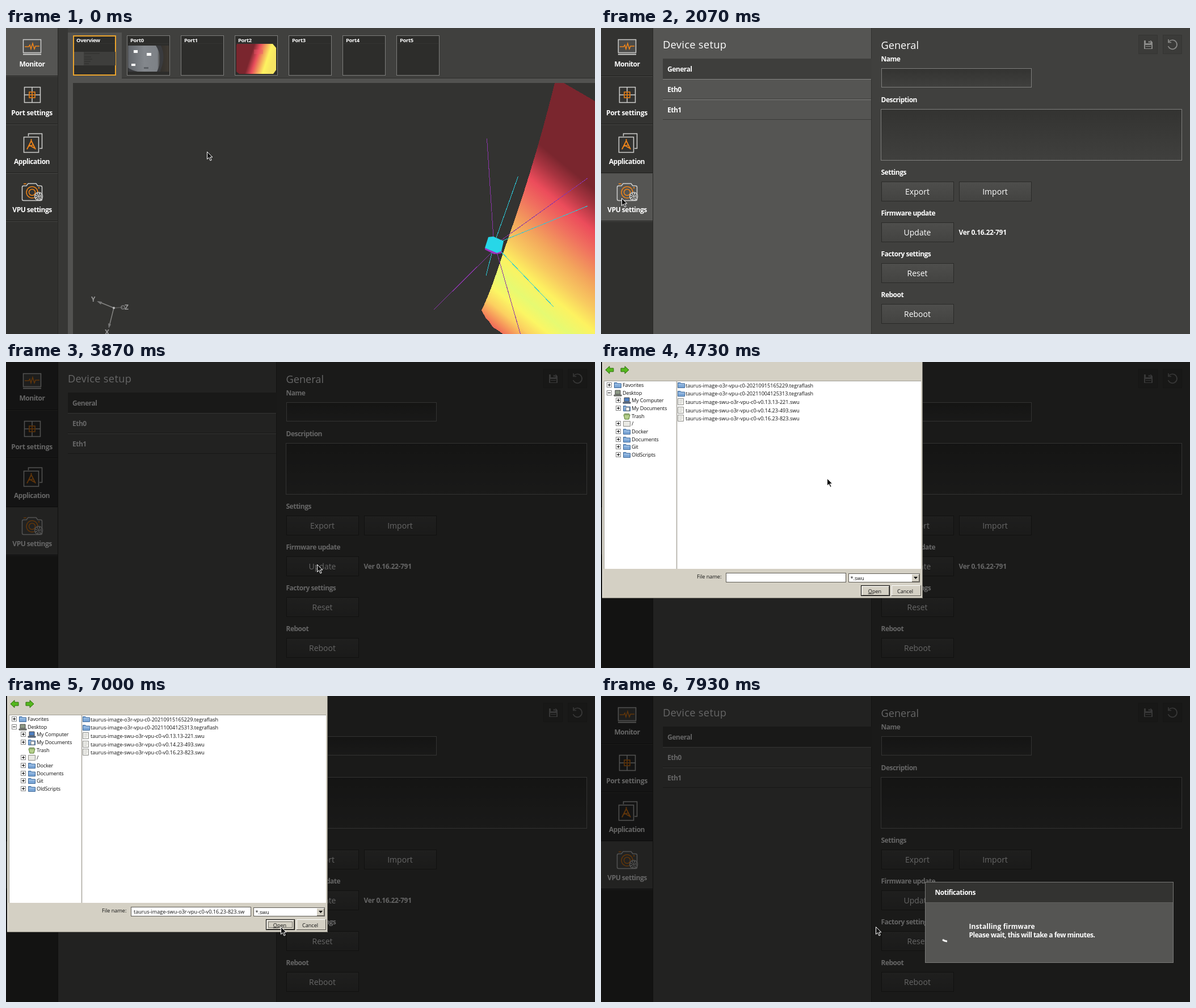
Animation of 1038 by 540 pixels, one loop 8000 ms. Source, as an HTML page:

```html
<!DOCTYPE html>
<html lang="en">
<head>
<meta charset="utf-8">
<title>Firmware update</title>
<style>
html, body { margin: 0; width: 100%; height: 100%; overflow: hidden; background: #333331; }
svg { display: block; font-family: "Open Sans", "Noto Sans", sans-serif; cursor: default; }
text { fill: #fff; font-size: 12px; font-weight: 700; letter-spacing: -.5px; white-space: pre; }
.mid { text-anchor: middle; }
.loose { letter-spacing: -.3px; }
.open { letter-spacing: .1px; }
.tab { font-size: 9.4px; letter-spacing: -.3px; }
.head { font-size: 18.2px; font-weight: 500; letter-spacing: 0; }
.head.loose { letter-spacing: .35px; }
.label { font-size: 14px; font-weight: 500; letter-spacing: 0; }
.axis { font-size: 12px; fill: #999; letter-spacing: 0; }
.crisp { shape-rendering: crispEdges; }
#dialog text { fill: #111; font-size: 9.1px; font-weight: 400; letter-spacing: 0; }
#dialog .node { letter-spacing: -.15px; }
#dialog .lit { fill: #fff; }

/* the small lead keeps every switch just ahead of its frame time */
.play { animation: 8s step-end -10ms infinite; }
#monitor { animation-name: monitor; }
#setup { animation-name: setup; }
#mark { animation-name: mark; }
#hover { animation-name: hover; }
#dim { animation-name: dim; }
#dialog { animation-name: dialog; }
#files { animation-name: files; }
#caret { animation-name: caret; }
#picked { animation-name: picked; }
#row { animation-name: row; }
#focus { animation-name: focus; }
#note { animation-name: note; }
#ring { animation-name: spin, arc; animation-timing-function: steps(11, start), steps(6, start); }
#cursor { animation-name: cursor; animation-timing-function: steps(2, start); }

@keyframes monitor { 0% { opacity: 1 } 25%, 100% { opacity: 0 } }
@keyframes setup { 0% { opacity: 0 } 25%, 100% { opacity: 1 } }
@keyframes mark { 0% { transform: none } 25%, 100% { transform: translateY(256px) } }
@keyframes hover { 0% { opacity: 0 } 39.167% { opacity: 1 } 48.333%, 100% { opacity: 0 } }
@keyframes dim { 0% { opacity: 0 } 48.333%, 100% { opacity: .6 } }
@keyframes dialog { 0% { opacity: 0 } 49.167% { opacity: 1 } 90%, 100% { opacity: 0 } }
@keyframes files { 0% { opacity: 0 } 50%, 100% { opacity: 1 } }
@keyframes caret { 0%, 55.833%, 66.667%, 100% { opacity: 0 } 50%, 61.667% { opacity: 1 } }
@keyframes picked { 0% { opacity: 0 } 68.333%, 100% { opacity: 1 } }
@keyframes row { 0% { opacity: 0 } 68.333% { opacity: 1 } 87.5%, 100% { opacity: 0 } }
@keyframes focus { 0% { opacity: 0 } 87.5%, 100% { opacity: 1 } }
@keyframes note { 0% { opacity: 0 } 90.833%, 100% { opacity: 1 } }
@keyframes spin { 0%, 90.833% { transform: rotate(-266deg) } 100% { transform: rotate(94deg) } }
@keyframes arc {
  0%, 90.833%, 98.5%, 100% { stroke-dasharray: 8.5 100 }
  94.5% { stroke-dasharray: 36 100 }
}
@keyframes cursor {
  0%, 13.333% { transform: translate(354px, 218px); animation-timing-function: steps(3, start) }
  15.833% { transform: translate(277px, 211px); animation-timing-function: steps(4, start) }
  19.167% { transform: translate(33px, 293px); animation-timing-function: steps(1, start) }
  20%, 30% { transform: translate(36px, 300px); animation-timing-function: steps(7, start) }
  35.833%, 37.5% { transform: translate(440px, 302px); animation-timing-function: steps(3, start) }
  40%, 41.667% { transform: translate(520px, 345px); animation-timing-function: steps(5, start) }
  45.833%, 55% { transform: translate(548px, 357px); animation-timing-function: steps(3, start) }
  57.5%, 58.333% { transform: translate(499px, 304px) }
  60%, 60.833% { transform: translate(398px, 205px) }
  62.5%, 63.333% { transform: translate(333px, 129px) }
  65%, 65.833% { transform: translate(311px, 106px) }
  67.5%, 73.333% { transform: translate(302px, 96px) }
  75%, 75.833% { transform: translate(415px, 283px) }
  77.5%, 78.333% { transform: translate(479px, 384px) }
  80% { transform: translate(485px, 407px); animation-timing-function: step-end }
  80.833% { transform: translate(486px, 408px); animation-timing-function: step-end }
  84.167%, 100% { transform: translate(484px, 407px) }
}
</style>
</head>
<body>
<svg width="1038" height="540" viewBox="0 0 1038 540">
  <defs>
    <linearGradient id="heat" gradientUnits="userSpaceOnUse" x1="940" y1="205" x2="738" y2="451">
      <stop offset="0" stop-color="#7a262e"/>
      <stop offset=".08" stop-color="#a83440"/>
      <stop offset=".18" stop-color="#ec4c5b"/>
      <stop offset=".28" stop-color="#f0705f"/>
      <stop offset=".41" stop-color="#f3a55c"/>
      <stop offset=".52" stop-color="#f8cb60"/>
      <stop offset=".61" stop-color="#fdf260"/>
      <stop offset=".71" stop-color="#e6fa72"/>
      <stop offset=".78" stop-color="#fbf664"/>
      <stop offset=".85" stop-color="#fcd060"/>
      <stop offset=".91" stop-color="#f5905a"/>
      <stop offset=".97" stop-color="#ec5058"/>
    </linearGradient>
    <linearGradient id="thumb" x2="1" y2=".25">
      <stop offset=".43" stop-color="#7a262e"/>
      <stop offset=".58" stop-color="#e84c5b"/>
      <stop offset=".72" stop-color="#f3a55c"/>
      <stop offset=".85" stop-color="#fdf260"/>
      <stop offset="1" stop-color="#f6e562"/>
    </linearGradient>
    <linearGradient id="photo">
      <stop offset="0" stop-color="#62666b"/>
      <stop offset=".4" stop-color="#83878c"/>
      <stop offset=".72" stop-color="#7d8186"/>
      <stop offset=".8" stop-color="#34322e"/>
      <stop offset="1" stop-color="#3f3932"/>
    </linearGradient>
    <linearGradient id="field" x2="0" y2="1">
      <stop offset="0" stop-color="#333331"/><stop offset="1" stop-color="#40403e"/>
    </linearGradient>
    <linearGradient id="push" x2="0" y2="1">
      <stop offset="0" stop-color="#4e4e4c"/><stop offset="1" stop-color="#434341"/>
    </linearGradient>
    <clipPath id="nameClip"><rect x="222" y="374" width="208" height="14"/></clipPath>
    <g id="folder">
      <path d="M.5 1.5H5L6.500 3H12.500V10.500H.5Z" fill="#7ba6d6" stroke="#3c6797"/>
      <path d="M1 5H12" stroke="#b9d3ef"/>
    </g>
    <g id="doc">
      <path d="M.5 .5H10.500V11.500H.5Z" fill="#f4f4f0" stroke="#8c8c88"/>
      <path d="M2.500 3.500H8.500M2.500 6H8.500M2.500 8.500H7" stroke="#c4c4c0"/>
    </g>
    <path id="arrow" d="M0 6.500L7 0V3.500H14V9.500H7V13Z" fill="#55b81e" stroke="#2c6f0c"/>
  </defs>

  <rect width="1038" height="540" fill="#30302e"/>

  <g id="monitor" class="play">
    <rect x="92" width="946" height="540" fill="#40403e"/>
    <rect x="92" width="17" height="540" fill="#373735"/>
    <path d="M109 540V8H204V89H1038V540Z" fill="#525250"/>
    <path d="M204 88.500H1038" stroke="#2d2d2b"/>
    <rect x="118" y="97" width="920" height="443" fill="#333331"/>
    <g id="tabs"></g>
    <path d="M120 42H193V66H120Z" fill="#3e3e3c"/>
    <path d="M120 42H137V66H120Z" fill="#4a4a48"/>
    <path d="M138 45H165M138 51H150M138 55H152M138 59H149M138 63H146" stroke="#2f2f2d"/>
    <rect x="215" y="31" width="72" height="46" fill="url(#photo)"/>
    <path d="M215 77V70Q222 75 232 77ZM264 31Q278 52 266 77H271Q283 52 273 31Z" fill="#3a3b3e"/>
    <path d="M225 39H232V44H225ZM248 44H256V49H248ZM221 63H228V67H221Z" fill="#fff"/>
    <path d="M243 69H251V72H243Z" fill="#5b5f64"/>
    <path d="M407 28H470L476 35V74L471 81H411L406 77V30Z" fill="url(#thumb)"/>
    <path d="M437 38H453V46H437Z" fill="#e9566a" opacity=".4"/>

    <path class="crisp" d="M967 97H983L1038 129V540H876L866 533L858 528L852 519L846 513L838 498Q853 468 870 415L905 313Q941 203 967 97Z" fill="url(#heat)"/>
    <g class="crisp" fill="none" stroke="#2cc8d8">
      <path d="M902.500 262L864 370M1025 314L874 376M965 492L868 390M846 437L857 394"/>
      <path d="M847.500 195L859 370M1025 265L872 375M754 497L858 394M906.500 540L865 396" stroke="#8a35a8"/>
    </g>
    <path d="M844 388L866 396L874 393L872 398L860 399L844 391Z" fill="#a032c0"/>
    <path d="M850 369L859 368L877 376L873 394L865 397L844 388Z" fill="#27d7e8"/>

    <g fill="none" stroke="#858583" stroke-width="1.500">
      <path d="M190 494L163 483M190 494L182 526"/>
      <path d="M190 494L206 493" stroke="#5d5d5b"/>
      <circle cx="206" cy="493" r="3" stroke="#777"/>
    </g>
    <path d="M160 482L169 483L167 488ZM181 530L180 521L185 523Z" fill="#777"/>
    <circle cx="190" cy="494" r="2" fill="#bbb"/>
    <text class="axis" x="150" y="483">Y</text>
    <text class="axis" x="209" y="497">Z</text>
    <text class="axis" x="174" y="541">X</text>
  </g>

  <g id="setup" class="play">
    <rect x="92" width="384" height="540" fill="#555553"/>
    <rect x="476" width="562" height="540" fill="#40403e"/>
    <path d="M476.500 0V540" stroke="#30302e"/>
    <text class="head loose" x="109" y="36">Device setup</text>
    <rect x="109" y="54" width="368" height="36" fill="#3e3e3c"/>
    <path d="M109 90.500H476M109 126.500H476" stroke="#858583"/>
    <path d="M109 125.500H476M109 161.500H476" stroke="#3a3a38"/>
    <text x="117" y="77">General</text>
    <text x="117" y="113">Eth0</text>
    <text x="117" y="149">Eth1</text>
    <text class="head" x="493.500" y="37">General</text>
    <g id="labels"></g>
    <g fill="url(#field)" stroke="#7f7f7d">
      <rect x="494.500" y="71.500" width="264" height="33"/>
      <rect x="493.500" y="143.500" width="530" height="90"/>
    </g>
    <g fill="#3b3b39" stroke="#353533">
      <rect x="947.500" y="12.500" width="33" height="33"/>
      <rect x="990.500" y="12.500" width="33" height="33"/>
    </g>
    <path d="M957 22H969L972 25V37H957Z" fill="#8b8b89"/>
    <path d="M960 22H968V27H960ZM959 30H970V36H959Z" fill="#3b3b39"/>
    <path d="M965 23H967V26H965ZM960 32H969V33H960Z" fill="#8b8b89"/>
    <path d="M1001 24A8 8 0 1 1 999.500 32M1000 20V25.500H1005" fill="none" stroke="#8b8b89" stroke-width="1.700"/>
    <g id="buttons"></g>
    <g id="hover" class="play">
      <rect x="494.500" y="343.500" width="127" height="34" fill="#5c5c5a" stroke="#2a2a28"/>
      <text class="label mid" x="557.500" y="366">Update</text>
    </g>
    <text class="loose" x="630.500" y="365">Ver 0.16.22-791</text>
  </g>

  <g id="sidebar">
    <rect width="92" height="341" fill="#333331"/>
    <rect id="mark" class="play" width="92" height="85" fill="#555553"/>
    <path d="M0 84.500H92M0 169.500H92M0 255.500H92M0 340.500H92" stroke="#1f1f1d"/>
    <path d="M0 85.500H92M0 170.500H92M0 256.500H92M0 341.500H92" stroke="#484846"/>
    <path d="M91.500 0V540" stroke="#282826"/>
    <g fill="none" stroke="#cfcfcd" stroke-width="1.500">
      <path d="M30.500 20.500H61.500V43.500H30.500Z" fill="#4b4b49"/>
      <path d="M30 46.500H62" stroke-width="2"/>
      <path d="M33 33H40L42 30L44 37L47 27L50 37L52 32H59" stroke="#f08519"/>
      <path d="M32.500 104.500H60.500V131.500H32.500ZM46 104V112M46 124V132M32 118H40M52 118H60"/>
      <path d="M41 113H51V123H41ZM46 113V123M41 118H51" stroke="#f08519"/>
      <path d="M39.500 191V186.500H63.500V212.500H59"/>
      <path d="M31.500 192.500H57.500V219.500H31.500Z"/>
      <path d="M37 214L44.500 199L52 214M39 209L49 206M44.500 199V196M40 206L50 212" stroke="#f08519" stroke-width="1.800"/>
      <path d="M31 278.500H36L39 274.500H53L56 278.500H61Q63.500 278.500 63.500 281V302Q63.500 304.500 61 304.500H31Q28.500 304.500 28.500 302V281Q28.500 278.500 31 278.500Z"/>
      <g stroke="#f08519"><circle cx="46" cy="290" r="10"/><circle cx="46" cy="290" r="5.500"/><path d="M31 275H36"/></g>
      <circle cx="57.500" cy="297" r="7" fill="#3b3b39"/>
      <circle cx="57.500" cy="297" r="4.500" stroke-width="3" stroke-dasharray="2 1.530"/>
      <circle cx="57.500" cy="297" r="1.500"/>
    </g>
    <circle cx="58" cy="282" r="1.300" fill="#f08519"/>
    <text class="mid" x="46" y="68">Monitor</text>
    <text class="mid loose" x="45.500" y="154">Port settings</text>
    <text class="mid" x="45.500" y="240">Application</text>
    <text class="mid" x="46" y="325">VPU settings</text>
  </g>

  <rect id="dim" class="play" width="1038" height="540"/>

  <g id="dialog" class="play">
    <path d="M2 0H567V417H2Z" fill="#d4d0c4"/>
    <path d="M2.500 0V416" stroke="#efede6"/>
    <path d="M566.500 0V416.500H2" fill="none" stroke="#77746c"/>
    <use href="#arrow" x="8" y="7.500"/>
    <use href="#arrow" transform="translate(49 7.500) scale(-1 1)"/>
    <path d="M6 33H564V365H6Z" fill="#fff"/>
    <path d="M5.500 365V33.500H564" fill="none" stroke="#a09d94"/>
    <path d="M133.500 33V365" stroke="#aaa79e" stroke-width="1.500"/>
    <g id="tree"></g>
    <g id="files" class="play"></g>
    <g id="row" class="play">
      <rect x="148" y="92" width="203" height="14" fill="#0a246a"/>
      <text class="lit" x="149" y="103">taurus-image-swu-o3r-vpu-c0-v0.16.23-823.swu</text>
    </g>
    <text x="169" y="382">File name:</text>
    <g fill="#fff" stroke="#5f5c55">
      <rect x="220.500" y="372.500" width="211" height="16"/>
      <rect x="436.500" y="373.500" width="125" height="15"/>
    </g>
    <path d="M548 375H561V388H548Z" fill="#d4d0c4"/>
    <path d="M548 387.500H560.500V375" fill="none" stroke="#66635c"/>
    <path d="M551 379H558L554.500 383Z"/>
    <text x="439.500" y="385">*.swu</text>
    <path id="caret" class="play" d="M225.500 374V386" stroke="#000"/>
    <g clip-path="url(#nameClip)">
      <text id="picked" class="play" x="225" y="384">taurus-image-swu-o3r-vpu-c0-v0.16.23-823.sw</text>
    </g>
    <rect x="458.500" y="394.500" width="50" height="18" fill="#d4d0c4" stroke="#000"/>
    <path d="M460 411V396H507" fill="none" stroke="#fff"/>
    <path d="M460 411.500H507.500V396" fill="none" stroke="#66635c"/>
    <path d="M512.500 412V394.500H563" fill="none" stroke="#fff"/>
    <path d="M512 412.500H563.500V394" fill="none" stroke="#55524c"/>
    <rect id="focus" class="play" x="462.500" y="398.500" width="42" height="10" fill="none" stroke="#222" stroke-dasharray="1 1"/>
    <text class="mid" x="482.500" y="407.500"><tspan text-decoration="underline">O</tspan>pen</text>
    <text class="mid" x="536" y="407.500">Cancel</text>
  </g>

  <g id="note" class="play">
    <rect x="571.500" y="328.500" width="437" height="142" fill="#555553"/>
    <rect x="571.500" y="328.500" width="437" height="35.500" fill="#333331"/>
    <path d="M572 364.500H1008" stroke="#5f5f5d"/>
    <rect x="571.500" y="328.500" width="437" height="142" fill="none" stroke="#7a7a78"/>
    <text x="588.500" y="351">Notifications</text>
    <text class="open" x="648.500" y="411">Installing firmware</text>
    <text x="648.500" y="426">Please wait, this will take a few minutes.</text>
    <g transform="translate(611 418)">
      <circle id="ring" class="play" r="15" fill="none" stroke="#fff" stroke-width="3"/>
    </g>
  </g>

  <path id="cursor" class="play" d="M.5 .5V13.500L3.600 10.700L6 16L8.200 15L5.800 9.900H10Z" fill="#111" stroke="#fff"/>
</svg>

<script>
const fill = (id, items, draw) => {
  document.getElementById(id).innerHTML = items.map(draw).join("");
};

fill("tabs", ["Overview", "Port0", "Port1", "Port2", "Port3", "Port4", "Port5"], (name, i) => {
  const x = 118 + 95 * i, line = i ? 1 : 2;
  return `<rect x="${x + line / 2}" y="${13 + line / 2}" width="${76 - line}" height="${71 - line}"
      fill="#2d2d2b" stroke="${i ? "#7d7d7b" : "#eba42c"}" stroke-width="${line}"/>
    <path d="M${x + 2} 27.500H${x + 74}" stroke="#353533"/>
    <text class="tab" x="${x + 6}" y="24.500">${name}</text>`;
});

fill("labels", [
  ["Name", 59], ["Description", 131], ["Settings", 259],
  ["Firmware update", 331], ["Factory settings", 403], ["Reboot", 475]
], ([name, y]) => `<text x="493.500" y="${y}">${name}</text>`);

fill("buttons", [
  ["Export", 494, 271], ["Import", 631, 271], ["Update", 494, 343],
  ["Reset", 494, 415], ["Reboot", 494, 487]
], ([name, x, y]) => `<rect x="${x + .5}" y="${y + .5}" width="127" height="34" fill="url(#push)" stroke="#2a2a28"/>
  <text class="label mid" x="${x + 63.5}" y="${y + 23}">${name}</text>`);

const folder = '<use href="#folder"/>';
const screen = color => `<path d="M2 1H11V8H2ZM0 9H13V11H0Z" fill="${color}" stroke="#444"/>`;
const trash = '<path d="M1 3H12L10 11H3Z" fill="#b5cf8c" stroke="#557a2c"/><path d="M2 1.500H11" stroke="#557a2c"/>';
const drive = '<path d="M.5 1.500H12.500V10.500H.5Z" fill="#e9e9e4" stroke="#8c8c88"/>';
const papers = folder + '<path d="M5 4H11V10H5Z" fill="#fff" stroke="#777"/>';

fill("tree", [
  ["Favorites", folder, "+"], ["Desktop", screen("#8d9a86"), "-"],
  ["My Computer", screen("#4f7fc0"), "+"], ["My Documents", papers, "+"],
  ["Trash", trash, ""], ["/", drive, "+"], ["Docker", folder, "+"],
  ["Documents", folder, "+"], ["Git", folder, "+"], ["OldScripts", folder, "+"]
], ([name, icon, sign], i) => {
  const y = Math.round(40 + 13.67 * i), x = i < 2 ? 10 : 26;
  const bars = `M${x + 2} ${y}.5H${x + 7}` + (sign === "+" ? `M${x + 4.5} ${y - 2}V${y + 3}` : "");
  const box = sign && `<rect x="${x + .5}" y="${y - 3.5}" width="8" height="8" fill="#fff" stroke="#888"/>
    <path d="${bars}" stroke="#000"/>`;
  return `${box}<g transform="translate(${x + 13} ${y - 5})">${icon}</g>
    <text class="node" x="${x + 28}" y="${y + 4}">${name}</text>`;
});

fill("files", [
  "o3r-vpu-c0-20210915165229.tegraflash", "o3r-vpu-c0-20211004125313.tegraflash",
  "swu-o3r-vpu-c0-v0.13.13-221.swu", "swu-o3r-vpu-c0-v0.14.23-493.swu",
  "swu-o3r-vpu-c0-v0.16.23-823.swu"
], (name, i) => {
  const y = 41 + 14.6 * i;
  return `<use href="#${i < 2 ? "folder" : "doc"}" x="135" y="${Math.round(y) - 6}"/>
    <text x="149" y="${y + 3.8}">taurus-image-${name}</text>`;
});
</script>
</body>
</html>
```
